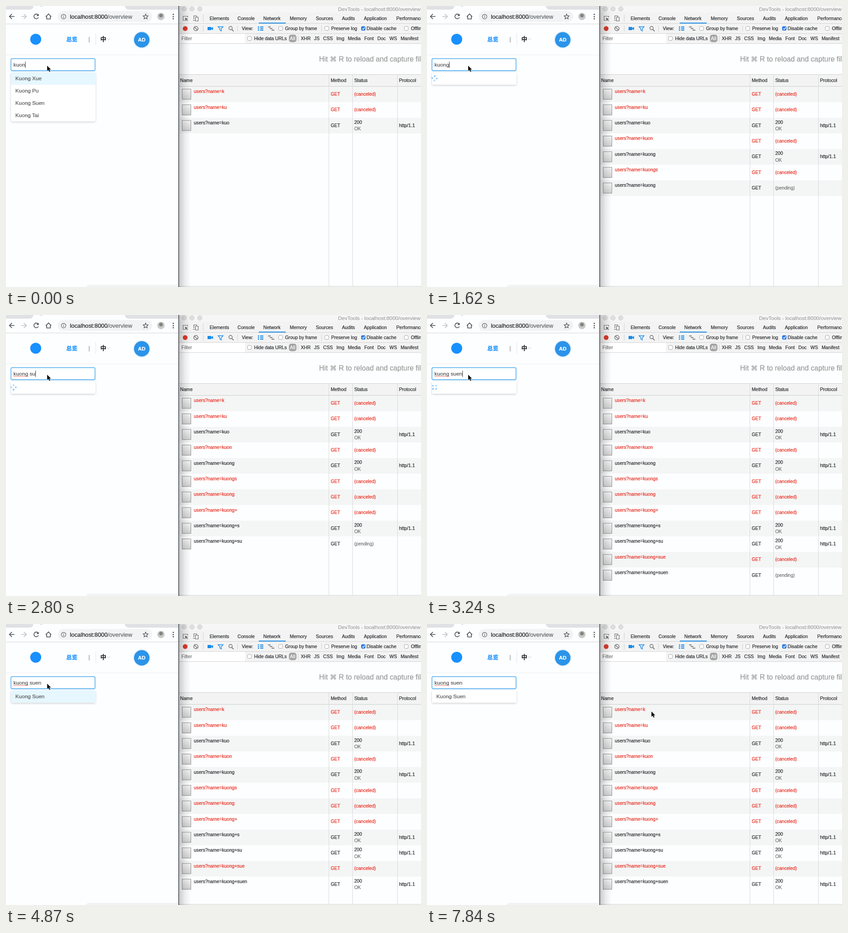
Write an HTML page that moves like this. It is 908x617 px and loops after 7990 ms.

```html
<!DOCTYPE html>
<html lang="en">
<head>
<meta charset="utf-8">
<title>Search with cancelled requests</title>
<style>
html, body { margin: 0; width: 100%; height: 100%; overflow: hidden; background: #fdfeff; }
svg { display: block; }
text { font-family: "Liberation Sans", Arial, sans-serif; white-space: pre; stroke-width: .22px; }
.cjk { font-family: "Noto Sans CJK SC", "Noto Sans CJK", sans-serif; font-weight: bold; }
.sym { font-family: "DejaVu Sans", sans-serif; }
</style>
</head>
<body>
<svg width="908" height="617" viewBox="0 0 908 617">
  <defs>
    <linearGradient id="edge"><stop stop-opacity=".2"/><stop offset=".5" stop-opacity=".07"/><stop offset="1" stop-opacity="0"/></linearGradient>
    <linearGradient id="thumb" x2="0" y2="1"><stop stop-color="#f4f4f4"/><stop offset="1" stop-color="#d2d2d2"/></linearGradient>
    <filter id="drop" x="-10%" y="-30%" width="120%" height="180%"><feDropShadow dx="0" dy="1.5" stdDeviation="2.2" flood-opacity=".2"/></filter>
  </defs>
  <g id="rows"></g>
  <g id="chrome"></g>
  <g id="live"></g>
</svg>
<script>
const LOOP = 7990, STEP = 147.7, LAST = 53, ROW = 34.33, ITEM = 26.8;
const BLUE = '#1890ff', RED = '#e8291c', DARK = '#26282b', GREY = '#707070', LINE = '#cdcdcd';
const $ = id => document.getElementById(id);

const text = (x, y, s, size = 10.1, fill = DARK, extra = '') =>
  `<text x="${x}" y="${y}" font-size="${size}" fill="${fill}" stroke="${fill}" ${extra}>${s}</text>`;
const rect = (x, y, w, h, fill, extra = '') =>
  `<rect x="${x}" y="${y}" width="${w}" height="${h}" fill="${fill}" ${extra}/>`;
const circle = (x, y, r, fill, extra = '') =>
  `<circle cx="${x}" cy="${y}" r="${r}" fill="${fill}" ${extra}/>`;
const stroke = (d, color, width = 1, extra = '') =>
  `<path d="${d}" fill="none" stroke="${color}" stroke-width="${width}" ${extra}/>`;
const shape = (d, fill, extra = '') => `<path d="${d}" fill="${fill}" ${extra}/>`;
const checkbox = (x, y, on) =>
  rect(x + .5, y + .5, 8.5, 8.5, on ? '#2a7de1' : '#fff', `rx="2" stroke="${on ? '#2a7de1' : '#a9a9a9'}"`) +
  (on ? stroke(`M${x + 2.5} ${y + 5}l2 2 3.5-4.5`, '#fff', 1.4) : '');

function browser() {
  return shape('M0 0H60Q59 8 51 8H0ZM260 0H377V8H270Q261 8 260 0Z', '#dfe1e5') +
    rect(75, 0, 4, .6, '#4ba3f5') +
    stroke('M0 39.5H377', '#d3d5d8') +
    stroke('M18.5 23H7.5M13 17.5L7.5 23 13 28.5', '#4a4d51', 1.6) +
    stroke('M33.5 23H44.5M39 17.5L44.5 23 39 28.5', '#bfc1c4', 1.6) +
    stroke('M70.2 19.4A5.2 5.2 0 1 0 71 25', '#4a4d51', 1.6) + shape('M71.5 17V22H66.5Z', '#4a4d51') +
    stroke('M87 23.5L93 17.5 99 23.5M89 22.5V28.5H97V22.5', '#4a4d51', 1.6) +
    rect(113, 11, 207, 24, '#f1f3f4', 'rx="12"') +
    circle(126, 23.3, 5, 'none', 'stroke="#5f6368" stroke-width="1.2"') +
    stroke('M126 22.5V26.3M126 20V21.3', '#5f6368', 1.2) +
    text(140, 27.5, 'localhost:8000<tspan fill="#5f6368" stroke="#5f6368">/overview</tspan>', 12.75, '#202124') +
    stroke('M305.5 17.8l1.6 3.6 3.9.4-2.9 2.6.8 3.8-3.4-2-3.4 2 .8-3.8-2.9-2.6 3.9-.4Z', '#4a4d51', 1.2) +
    circle(339, 23, 8, '#c9c9c7') + circle(339, 21, 4, '#85837f') +
    [18.5, 23.3, 28].map(y => circle(366, y, 1.4, '#4a4d51')).join('') +
    circle(65, 73, 12, BLUE) +
    text(132, 78, '总览', 12, BLUE, 'class="cjk"') +
    stroke('M182 68V80', '#777') + stroke('M196.5 60V85', '#e2e5e8') +
    text(206.5, 77, '中', 12.8, '#222', 'class="cjk"') +
    stroke('M221 71l3.5 3.5 3.5-3.5', '#c3c6c9') +
    circle(297, 74.3, 18.4, '#fff', 'stroke="#c7dff3" stroke-width=".8"') + circle(297, 74.3, 17, '#2b94e9') +
    text(297, 78.3, 'AD', 11.3, '#fff', 'font-weight="bold" text-anchor="middle"') +
    stroke('M0 107.5H377', '#e9edf1') +
    shape('M174 617Q177 612 183 612H377V617Z', '#f1f3f5');
}

function devtools() {
  const tabs = { Elements: 445.5, Console: 506.5, Network: 563, Memory: 621, Sources: 678, Audits: 735, Application: 783, Performance: 854 };
  const types = { XHR: 645, JS: 674, CSS: 694, Img: 723, Media: 748, Font: 784, Doc: 812.5, WS: 839, Manifest: 863.5 };
  const columns = { Name: 381, Method: 710.5, Status: 762, Protocol: 860 };
  const names = (list, y) => Object.entries(list).map(([s, x]) => text(x, y, s, 10.25)).join('');
  return rect(379, 0, 529, 82, '#f3f3f3') + rect(379, 0, 529, 14, '#f6f6f6') +
    [390, 407, 424].map(x => circle(x, 6.5, 5, '#dedede', 'stroke="#cfcfcf"')).join('') +
    text(726.5, 11, 'DevTools - localhost:8000/overview', 11.5, '#a0a0a0') +
    rect(379, 61, 144, 21, '#fff') +
    stroke('M379 38.5H908M379 60.5H908M379 82.5H908', '#d4d4d4') +
    stroke('M392 31.5H387.5V22.5H397.5V25', '#6e6e6e', 1.2) + shape('M391.5 25.5l7 3-3 1 2.5 3-1 1-2.7-3-1.6 2.5Z', '#6e6e6e') +
    stroke('M411 29V21.5H417V24M409 31.5H413.5M414.5 24.5H420.5V33H414.5Z', '#6e6e6e', 1.2) +
    stroke('M431.5 19V34M431.5 43V56M506.5 43V56M690.5 43V56M639.5 65V78', '#d0d0d0') +
    names(tabs, 30.5) + rect(553, 36.5, 59, 2, '#1a8be8') +
    circle(392, 49.5, 5.2, '#d93a2b') +
    circle(415.5, 49.5, 4.7, 'none', 'stroke="#6e6e6e" stroke-width="1.5"') + stroke('M412 46L419 53', '#6e6e6e', 1.5) +
    shape('M441 46H449V48.5L453 46V53L449 50.5V53H441Z', '#1a8be8') +
    stroke('M464 45.5H475L471 50V55L468 53V50Z', '#1a8be8', 1.4) +
    circle(491.3, 48.5, 3.7, 'none', 'stroke="#6e6e6e" stroke-width="1.4"') + stroke('M494 51.3L498 55.5', '#6e6e6e', 1.7) +
    text(516, 53, 'View:') +
    stroke('M551 46H554M556 46H563M551 49.5H554M556 49.5H563M551 53H554M556 53H563', '#1a8be8', 2) +
    stroke('M573.5 46H579M577 49.5H583M581 53H587', '#555', 1.6) +
    checkbox(596, 44.5) + text(610.5, 53, 'Group by frame') +
    checkbox(697, 44.5) + text(711.5, 53, 'Preserve log') +
    checkbox(777, 44.5, true) + text(789, 53, 'Disable cache', 10.4) +
    checkbox(871, 44.5) + text(886, 53, 'Offline') +
    text(384, 75, 'Filter', 10.3, '#777') +
    checkbox(528, 66.5) + text(543, 75, 'Hide data URLs') +
    rect(619, 63, 16.5, 16.5, '#a3a3a3', 'rx="5"') + text(621.3, 75, 'All', 10.3, '#fff') +
    names(types, 75) +
    text(685, 122, 'Hit', 15.7, '#9a9a9a') + text(708.5, 122, '⌘', 15, '#9a9a9a', 'class="sym"') +
    text(728, 122, 'R to reload and capture filmstrip.', 15.7, '#9a9a9a') +
    rect(379, 150, 529, 27, '#f3f3f3') + stroke('M379 150.5H908M379 176.5H908M379 615.5H908', LINE) +
    stroke('M706.5 150V615M758.5 150V615M856.5 150V615', '#d9d9d9') +
    names(columns, 167) +
    rect(379, 0, 25, 617, 'url(#edge)') + rect(377, 0, 1.8, 617, '#55585c');
}

// query, step sent, step settled, answered
const requests = [
  ['k', 0, 0], ['ku', 0, 0], ['kuo', 0, 0, 1], ['kuon', 1, 2], ['kuong', 2, 4, 1],
  ['kuongs', 5, 10], ['kuong', 10, 12], ['kuong ', 12, 15], ['kuong s', 15, 18, 1],
  ['kuong su', 19, 20, 1], ['kuong sue', 21, 22], ['kuong suen', 22, 33, 1]
];
const typing = [[0, 'kuon'], [2, 'kuong'], [4, 'kuongs'], [10, 'kuong'], [12, 'kuong '],
  [15, 'kuong s'], [18, 'kuong su'], [21, 'kuong sue'], [22, 'kuong suen']];
const people = ['Kuong Xue', 'Kuong Pu', 'Kuong Suen', 'Kuong Tai'];
const caretToggles = [26, 29, 32, 34, 38, 41, 44, 47, 50];
// step, x, y, hand
const pointer = [[0, 90, 131], [46, 107, 148, 1], [47, 145, 156, 1], [48, 172, 160, 1],
  [50, 265, 205], [51, 385, 246], [52, 455, 225], [53, 491, 192]];
const at = (list, step) => list.filter(e => e[0] <= step).pop();

function requestRow([query, , settled, ok], i, step) {
  const y = 176.8 + i * ROW, middle = y + 20.3, pending = step < settled;
  const color = pending || ok ? DARK : RED;
  const status = pending ? text(762, middle, '(pending)', 10.1, GREY)
    : ok ? text(762, y + 13.2, '200') + text(762, y + 27.8, 'OK', 10.1, GREY) + text(860, middle, 'http/1.1', 10.4)
    : text(762, middle, '(canceled)', 10.1, RED);
  return (i % 2 ? '' : rect(379, y, 529, ROW, '#f4f5f5')) +
    rect(385.5, y + 5.7, 19, 22.5, 'url(#thumb)', 'stroke="#8f8f8f"') +
    text(411, y + 14.4, 'users?name=' + query.replace(' ', '+'), 10.1, color) +
    text(710.5, middle, 'GET', 10.1, color) + status;
}

function spinner(step) {
  const t = step * 147.96;
  let dots = '';
  for (let k = 0; k < 4; k++) {
    const a = (45 + (t - 2360) * .3 + k * 90) * Math.PI / 180;
    const fade = Math.abs(((t / 1000 + k * .4) % 2) - 1);
    dots += circle(16.5 + 4.9 * Math.cos(a), 158.8 + 4.9 * Math.sin(a), 2, BLUE, `opacity="${.28 + .25 * fade}"`);
  }
  return dots;
}

function dropdown(step, sent) {
  const [query, , settled] = sent[sent.length - 1];
  const busy = step < settled;
  const found = busy ? [] : people.filter(p => p.toLowerCase().startsWith(query));
  return rect(11, 146, 184.5, Math.max(1, found.length) * ITEM, '#fff', 'rx="3" filter="url(#drop)"') +
    (busy ? spinner(step) : step < 50 ? rect(11, 146, 184.5, ITEM, '#e6f7ff') : '') +
    found.map((p, i) => text(20.5, 163.3 + i * ITEM, p, 11.6, '#555')).join('');
}

function cursor([, x, y, hand]) {
  const body = hand
    ? shape('M3.5 8V1.5Q4.6 0 5.7 1.5V5Q7 4 8 5.3 9.3 4.5 10 6 11.8 5.5 12 7.2V10.5Q11.5 12 10.8 14H5.2Q4 11.5 .6 8.3 1.4 6.2 3.5 8Z', '#fff', 'stroke="#222" stroke-width="1.1"') +
      stroke('M5.9 8V11M8 8V11M10 8V11', '#222', .8)
    : shape('M0 0V11.8L2.8 9.3 4.7 13.6 6.8 12.7 4.9 8.6H8.5Z', '#111', 'stroke="#fff" paint-order="stroke"');
  return `<g transform="translate(${x} ${y})">${body}</g>`;
}

function draw(step) {
  const sent = requests.filter(r => r[1] <= step);
  const query = at(typing, step)[1];
  const caretOn = caretToggles.filter(s => s <= step).length % 2 === 0;
  $('rows').innerHTML = sent.map((r, i) => requestRow(r, i, step)).join('');
  $('live').innerHTML = dropdown(step, sent) +
    rect(10, 114.5, 186, 29, 'none', 'rx="4" stroke="#dff0fd"') +
    rect(10.9, 115.6, 183.8, 26.4, '#fff', 'rx="2.5" stroke="#3fa5ec" stroke-width="1.3"') +
    text(16.3, 133, query, 11.8, '#555', 'id="query"') +
    (query.includes(' ') ? stroke('M17 135H48', '#e2574c', 1.5, 'stroke-dasharray="1.5 1.2"') : '') +
    '<path id="caret" stroke="#333"/>' + cursor(at(pointer, step));
  const x = 16.8 + $('query').getComputedTextLength();
  if (caretOn) $('caret').setAttribute('d', `M${x} 122V136`);
}

$('chrome').innerHTML = browser() + devtools();

let shown = -1;
function tick() {
  const step = Math.min(LAST, Math.floor((performance.now() % LOOP + 10) / STEP));
  if (step !== shown) draw(shown = step);
  requestAnimationFrame(tick);
}
tick();
</script>
</body>
</html>
```
